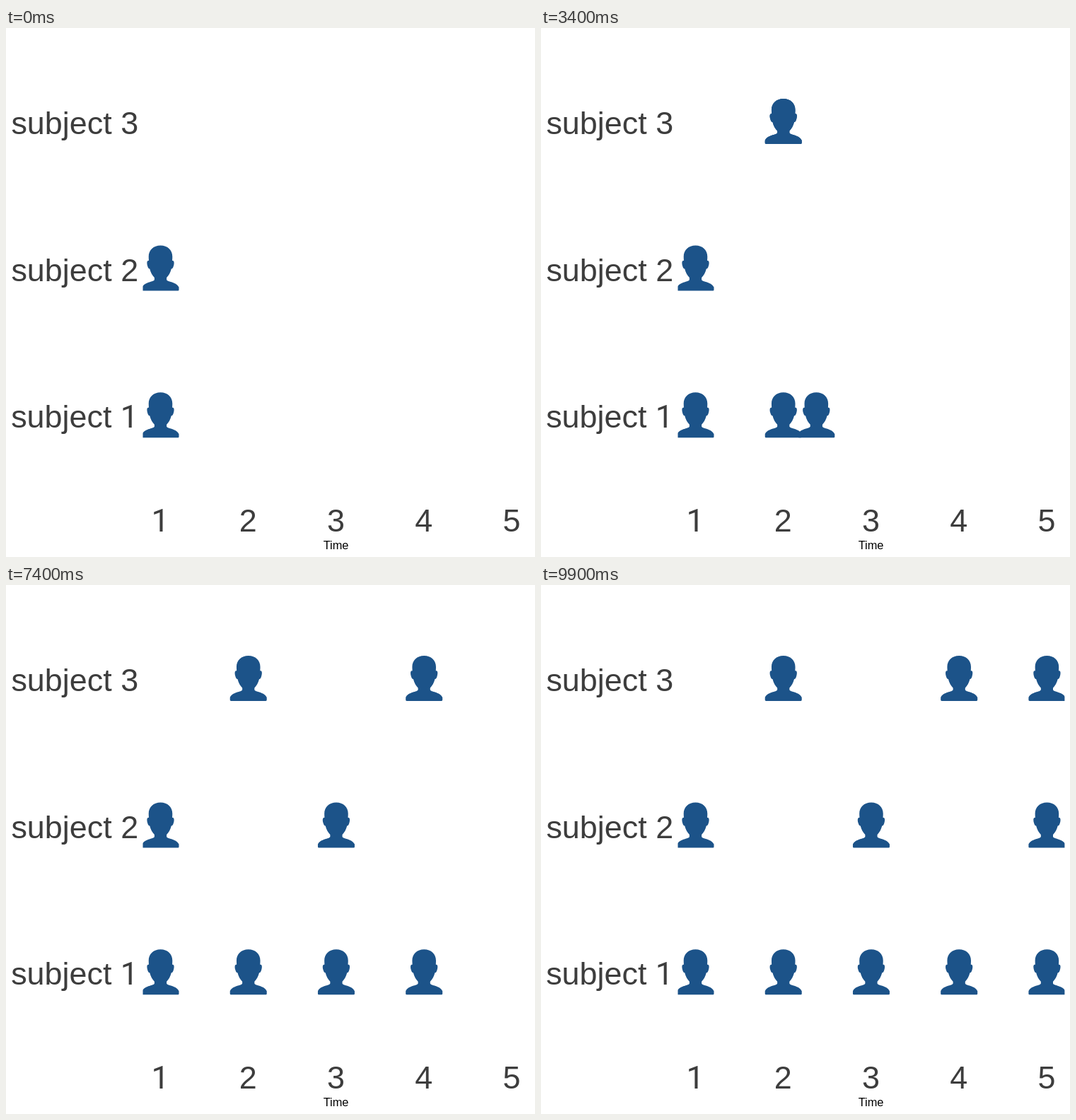
Animation of 748x748 px, one loop 10000 ms. Source, as an HTML page:

```html
<!DOCTYPE html>
<html lang="en">
<head>
<meta charset="utf-8">
<title>Subjects over time</title>
<style>
  html, body { margin: 0; width: 100%; height: 100%; overflow: hidden; background: #fff; }
  svg { display: block; width: 100vw; height: 100vh; }
  text { font-family: "Liberation Sans", Arial, sans-serif; }
  .label { font-size: 44.9px; fill: #3d3d3d; }
  .one { font-family: Roboto, sans-serif; }
  .title { font-size: 16.4px; fill: #000; }
</style>
</head>
<body>
<svg viewBox="0 0 748 748">
  <defs>
    <clipPath id="panel"><rect x="193.5" y="40" width="546.9" height="620"/></clipPath>
    <path id="person" fill="#1c5389" d="M0 0 C10 0 16.8 6.5 16.8 16 L16.6 21.5
      C19.5 20.5 19.6 25 18.4 29 C17.6 32 16.6 33.2 15.3 33
      C14 38.5 11.5 42.5 8.6 45.5 L8.6 48.3
      C9.5 51.5 22.5 51 26 59 L26 62.6 Q26 64 24.6 64
      L-24.6 64 Q-26 64 -26 62.6 L-26 59
      C-22.5 51 -9.5 51.5 -8.6 48.3 L-8.6 45.5
      C-11.5 42.5 -14 38.5 -15.3 33 C-16.6 33.2 -17.6 32 -18.4 29
      C-19.6 25 -19.5 20.5 -16.6 21.5 L-16.8 16 C-16.8 6.5 -10 0 0 0 Z"/>
  </defs>
  <g id="labels"></g>
  <g id="people" clip-path="url(#panel)"></g>
</svg>
<script>
const FRAME_MS = 100, FRAMES = 100;
const KEYS = [0, 25, 49, 74, 99];           // frame at which each time step is reached
const ROWS = [                              // time steps with a visit, per subject
  { name: 3, top: 100, visits: [1, 3, 4] },
  { name: 2, top: 307.6, visits: [0, 2, 4] },
  { name: 1, top: 515.3, visits: [0, 1, 2, 3, 4] },
];
const stepX = step => 218.5 + 124.23 * step;
const people = document.getElementById('people');
const labels = document.getElementById('labels');

function add(parent, tag, attrs, text = '') {
  const el = document.createElementNS('http://www.w3.org/2000/svg', tag);
  for (const key in attrs) el.setAttribute(key, attrs[key]);
  el.textContent = text;
  return parent.appendChild(el);
}

function addLabel(x, y, anchor, prefix, digit) {
  const el = add(labels, 'text', { x, y, 'text-anchor': anchor, class: 'label' }, prefix);
  add(el, 'tspan', digit === 1 ? { class: 'one' } : {}, digit);
}

for (const { name, top } of ROWS) addLabel(187.1, top + 50, 'end', 'subject ', name);
KEYS.forEach((_, step) => addLabel(stepX(step) - 0.4, 712.3, 'middle', '', step + 1));
add(labels, 'text', { x: 466.6, y: 737, 'text-anchor': 'middle', class: 'title' }, 'Time');

// Past visits stay; the current one slides on if the next step has a visit too.
function positions(visits, frame) {
  const step = KEYS.findLastIndex(key => key <= frame);
  const shown = visits.filter(visit => KEYS[visit] < frame);
  if (visits.includes(step)) {
    const moving = visits.includes(step + 1);
    shown.push(moving ? step + (frame - KEYS[step]) / (KEYS[step + 1] - KEYS[step]) : step);
  }
  return shown;
}

function draw(frame) {
  people.replaceChildren();
  for (const { top, visits } of ROWS)
    for (const step of positions(visits, frame))
      add(people, 'use', { href: '#person', x: stepX(step), y: top });
}

let start, lastFrame;
function tick(now) {
  start ??= now;
  const frame = Math.floor((now - start) / FRAME_MS) % FRAMES;
  if (frame !== lastFrame) draw(lastFrame = frame);
  requestAnimationFrame(tick);
}
draw(0);
requestAnimationFrame(tick);
</script>
</body>
</html>
```
